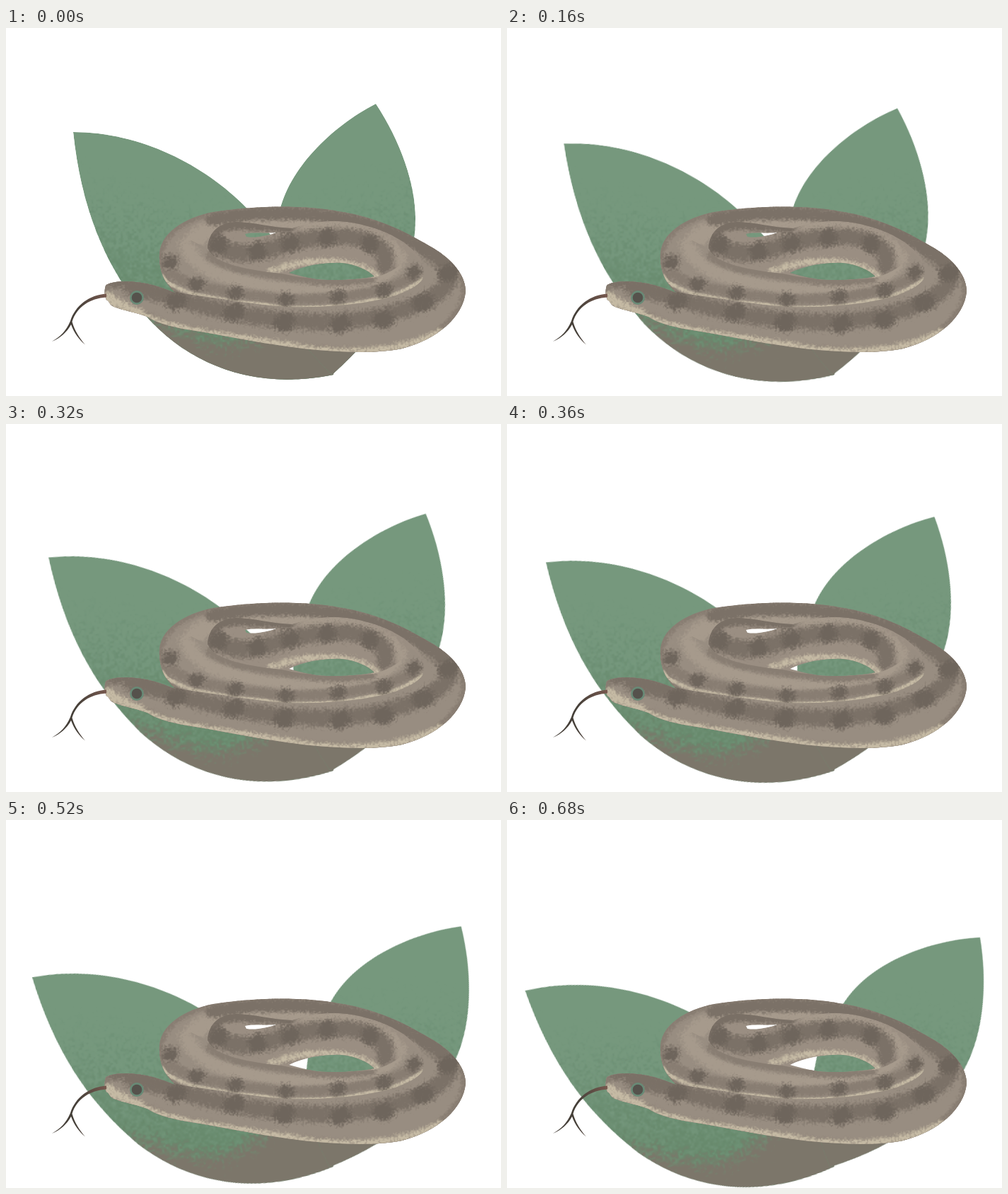
An HTML page with a canvas for the animation above (1.92 s loop, 700x520 px).

```html
<!DOCTYPE html>
<html lang="en">
<head>
<meta charset="utf-8">
<title>Snake on leaves</title>
<style>
html, body { margin: 0; width: 100%; height: 100%; overflow: hidden; background: #fff; }
canvas { display: block; }
</style>
</head>
<body>
<canvas id="stage" width="700" height="520"></canvas>
<script>
const start = performance.now();
const W = 700, H = 520, LOOP = 1920, STEP = 40, MOVE = 680;

const makeLayer = () => {
  const canvas = document.createElement('canvas');
  canvas.width = W;
  canvas.height = H;
  return canvas.getContext('2d', { willReadFrequently: true });
};

let seed = 20317;
const random = () => {
  seed = (Math.imul(seed, 1664525) + 1013904223) >>> 0;
  return seed / 4294967296;
};

// Smooth value noise, used as the threshold for stippled shading.
function noiseField(cell) {
  const cols = Math.ceil(W / cell) + 2, rows = Math.ceil(H / cell) + 2;
  const grid = Float32Array.from({ length: cols * rows }, random);
  const field = new Float32Array(W * H);
  for (let y = 0; y < H; y++) {
    const gy = Math.floor(y / cell), fy = y / cell - gy;
    for (let x = 0; x < W; x++) {
      const gx = Math.floor(x / cell), fx = x / cell - gx, i = gy * cols + gx;
      const top = grid[i] * (1 - fx) + grid[i + 1] * fx;
      const low = grid[i + cols] * (1 - fx) + grid[i + cols + 1] * fx;
      field[y * W + x] = 0.24 + 0.52 * (top * (1 - fy) + low * fy);
    }
  }
  return field;
}

const fine = noiseField(1.9), coarse = noiseField(3.2);
const scratch = makeLayer();

// Paints soft shapes, then turns their softness into grain.
function grain(layer, color, blur, field, paint) {
  scratch.clearRect(0, 0, W, H);
  scratch.filter = blur ? `blur(${blur}px)` : 'none';
  scratch.fillStyle = scratch.strokeStyle = color;
  paint(scratch);
  scratch.filter = 'none';
  const image = scratch.getImageData(0, 0, W, H), px = image.data;
  for (let i = 0; i < field.length; i++) {
    const a = px[4 * i + 3] / 255;
    px[4 * i + 3] = 255 * Math.min(1, Math.max(0, (a - field[i]) * 2 + 0.48));
  }
  scratch.putImageData(image, 0, 0);
  scratch.globalCompositeOperation = 'source-in';
  scratch.fillStyle = color;
  scratch.fillRect(0, 0, W, H);
  scratch.globalCompositeOperation = 'source-over';
  layer.drawImage(scratch.canvas, 0, 0);
}

const stripe = (layer, color, width, blur, d) => grain(layer, color, blur, fine, c => {
  c.lineWidth = width;
  c.lineCap = 'round';
  c.stroke(new Path2D(d));
});

const spots = (layer, points, rx, ry) => grain(layer, '#6e655c', 6, fine, c => {
  for (const [x, y] of points) {
    c.beginPath();
    c.ellipse(x, y, rx, ry, -0.35, 0, 7);
    c.fill();
  }
});

function band(layer, d, color, paint) {
  const path = new Path2D(d);
  layer.save();
  layer.clip(path, 'evenodd');
  layer.fillStyle = color;
  layer.fill(path, 'evenodd');
  paint();
  layer.restore();
}

const GREEN = '#76987d', DEEP = '#688a6d', EARTH = '#7c766a';

// shade: gradient line from light to dark; earth: area near the stem.
function makeLeaf(d, shade, earth) {
  const layer = makeLayer();
  band(layer, d, GREEN, () => {
    const fade = (color, from, to, peak) => grain(layer, color, 0, coarse, c => {
      const g = c.createLinearGradient(...shade);
      g.addColorStop(from, '#0000');
      g.addColorStop(to, `rgba(0,0,0,${peak})`);
      c.fillStyle = g;
      c.fillRect(0, 0, W, H);
    });
    fade('#71947a', 0, 0.6, 0.6);
    fade(DEEP, 0.1, 1, 0.72);
    grain(layer, EARTH, 19, coarse, c => c.fill(new Path2D(earth)));
  });
  return layer.canvas;
}

const leftLeaf = makeLeaf(
  `M95,147 C190,147 280,193 340,254 C400,318 472,405 463,490
   C348,513 258,474 198,407 C137,332 106,251 95,147Z`,
  [250, 200, 205, 420],
  'M180,385 C225,415 265,446 309,446 C350,442 390,424 430,385 L520,385 V560 H130Z');

const rightLeaf = makeLeaf(
  `M523,107 C459,140 399,200 386,262 C373,324 366,400 461,490
   C540,420 579,345 579,270 C579,220 558,160 523,107Z`,
  [460, 190, 550, 440],
  'M370,420 C430,423 480,400 580,390 V540 H360Z');

const CREAM = '#c5baa4', LIGHT = '#a69a8c', BODY = '#988d81', GREY = '#887d72', DARK = '#7b7167';
const OUTLINE = `M141,364 C148,356 185,357 207,363 C222,367 230,371 241,375
  C222,360 216,340 217,318 C220,285 262,264 300,259 C355,251 420,250 470,259
  C530,268 572,292 604,311 C632,328 650,350 650,372 C647,408 610,440 560,453
  C520,461 470,458 420,453 C370,447 320,437 275,429 C240,424 215,418 200,408
  C185,402 165,399 153,394 C145,391 148,387 142,384 C139,377 139,370 141,364Z`;
const HOLES = `M338,291 C350,288 365,291 383,289 C370,293 355,297 340,295Z
  M400,346 C425,334 455,331 475,332 C495,334 512,342 521,351
  C500,356 465,357 440,355 C425,353 412,349 400,346Z`;
const SPINE = `M175,366 C215,372 250,388 320,402 C400,418 480,420 545,403
  C605,386 642,362 622,335 C595,305 520,275 460,267 C400,259 340,262 290,271`;

function makeSnake() {
  const s = makeLayer();
  const line = (...args) => stripe(s, ...args);
  band(s, OUTLINE + HOLES, BODY, () => {
    // back and left side of the outer coil
    line(GREY, 12, 5, OUTLINE);
    line(LIGHT, 26, 8, 'M248,345 C246,305 275,285 315,276 C370,270 430,274 480,278');
    line(DARK, 18, 5, SPINE);

    // inner coil
    band(s, `M285,312 C286,287 303,274 325,274 C350,274 375,282 405,283
      C440,271 475,269 515,281 C560,294 592,320 592,348 C590,368 560,380 520,386
      L300,350Z` + HOLES, '#9a8e82', () => {
      line(LIGHT, 17, 7, 'M420,284 C480,268 558,295 566,345');
      line(DARK, 25, 7, 'M298,308 C340,330 370,312 400,304 C440,293 490,290 518,303 C541,315 540,326 534,338');
      line('#796f65', 14, 4, 'M289,320 C285,292 300,279 325,278 C350,277 375,283 405,282');
      line(CREAM, 9, 4, 'M372,345 C420,325 490,322 527,352');
      spots(s, [[301, 306], [355, 316], [402, 304], [455, 297], [514, 305]], 14, 14);
    });

    // second ring, front
    band(s, `M210,320 L262,300 L286,312 C292,332 340,342 390,347 C430,357 490,357 520,353
      C550,345 566,330 572,316 C592,330 594,345 588,357 C570,378 520,390 440,394
      C380,397 300,387 262,380 C230,372 215,350 210,320Z` + HOLES, BODY, () => {
      line(GREY, 11, 4, 'M218,315 C218,345 230,360 241,375');
      line(LIGHT, 21, 7, 'M255,305 C262,345 330,360 400,367 C470,372 530,362 558,328');
      line(GREY, 14, 5, 'M288,322 C320,344 390,350 430,355 C465,359 495,358 518,354');
      line(GREY, 15, 5, 'M234,345 C250,368 330,376 400,384 C470,384 540,374 578,350');
      line(CREAM, 5, 2, 'M220,348 C231,377 310,386 400,395 C480,398 560,382 591,353');
      spots(s, [[232, 330], [270, 362], [325, 375], [396, 384], [470, 380], [535, 371], [577, 345]], 13, 11);
    });

    // head and front body
    band(s, `M130,340 L207,363 C222,367 240,374 262,377 C300,381 350,391 400,394
      C480,396 560,386 588,357 C594,345 592,330 572,300 L700,320 V480 H130Z`, BODY, () => {
      line(GREY, 12, 5, OUTLINE);
      line(DARK, 24, 7, SPINE);
      line('#7a7066', 11, 5, 'M150,362 C190,360 225,374 262,382');
      line(CREAM, 10, 4, `M142,382 C165,400 190,403 213,415 C270,432 350,439 430,454
        C520,464 580,449 615,428`);
      line(CREAM, 10, 5, 'M143,376 C152,384 166,393 195,404');
      spots(s, [[240, 386], [322, 402], [394, 416], [473, 418], [534, 412], [590, 388], [625, 346]], 17, 13);
    });
  });

  // eye
  s.beginPath();
  s.arc(185, 381, 8.6, 0, 7);
  s.fillStyle = '#55524c';
  s.fill();
  s.lineWidth = 2.6;
  s.strokeStyle = '#688a76';
  s.stroke();

  // tongue
  const tint = s.createLinearGradient(142, 0, 100, 0);
  tint.addColorStop(0, '#77594f');
  tint.addColorStop(1, '#464039');
  s.fillStyle = tint;
  s.fill(new Path2D(`M142,375.5 C118,377 98,392 91,414 C85,428 77,436 65,443
    C77,438 86,430 92,419 C97,432 103,440 112,447.5 C104,438 97,428 93.5,415
    C100,394 119,382 142,380.5Z`));
  return s.canvas;
}

const snake = makeSnake();
const stage = document.getElementById('stage').getContext('2d');

function drawLeaf(leaf, x, y, degrees) {
  stage.save();
  stage.translate(x, y);
  stage.rotate(degrees * Math.PI / 180);
  stage.drawImage(leaf, -x, -y);
  stage.restore();
}

// Gentle ease: halfway between linear and smoothstep.
const ease = x => 0.5 * x + 0.5 * x * x * (3 - 2 * x);

function draw() {
  const t = Math.max(0, performance.now() - start) % LOOP;
  const p = ease(Math.min(1, Math.floor(t / STEP) * STEP / MOVE));
  stage.fillStyle = '#fff';
  stage.fillRect(0, 0, W, H);
  drawLeaf(leftLeaf, 461, 490, -13.4 * p);
  drawLeaf(rightLeaf, 458, 480, 24 * p);
  stage.drawImage(snake, 0, 0);
  requestAnimationFrame(draw);
}
draw();
</script>
</body>
</html>
```
